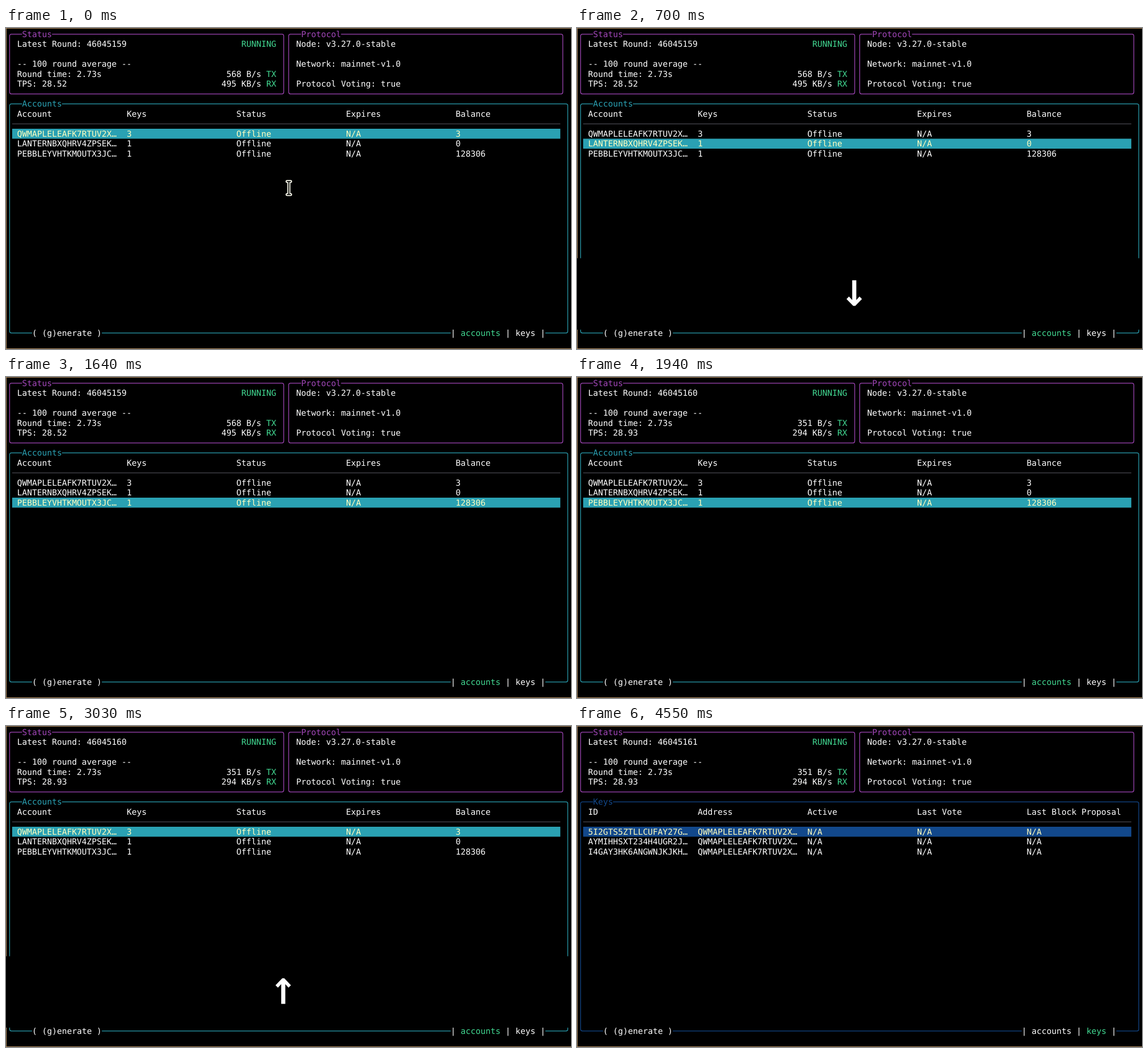
Write an HTML page that moves like this. It is 992 by 564 pixels and loops after 4610 ms.

```html
<!DOCTYPE html>
<html lang="en">
<head>
<meta charset="utf-8">
<title>Node terminal</title>
<style>
  html, body { margin: 0; width: 100%; height: 100%; overflow: hidden; background: #000; }
  svg { display: block; width: 992px; height: 564px; }
  text {
    font: 14.535px "DejaVu Sans Mono", monospace;
    fill: #fff;
    text-rendering: geometricPrecision;
    white-space: pre;
  }
</style>
</head>
<body>
<svg id="stage" viewBox="0 0 992 564" xmlns="http://www.w3.org/2000/svg"></svg>
<script>
const LOOP = 4610;
const CW = 8.75, CH = 17.5;            // terminal cell
const PURPLE = '#a347ba', CYAN = '#2aa1b3', BLUE = '#12488b';
const GREEN = '#42d992', PALE = '#ffffc0', EDGE = '#b58f62';
const COLS = [2, 24, 46, 68, 90];

// Key presses: time, key, and the row or view it leads to
const PRESSES = [
  { at: 540, key: 'down', row: 1 },
  { at: 1110, key: 'down', row: 2 },
  { at: 2160, key: 'up', row: 1 },
  { at: 2740, key: 'up', row: 0 },
  { at: 3790, key: 'enter', row: 0, keys: true }
];
const HOLD = 500, RECENT = 110;
const TRAFFIC_AT = 1800, ROUND_AT = 4450;

const ADDR = 'QWMAPLELEAFK7RTUV2X…';
const ACCOUNTS = {
  title: 'Accounts', color: CYAN,
  head: ['Account', 'Keys', 'Status', 'Expires', 'Balance'],
  rows: [
    [ADDR, '3', 'Offline', 'N/A', '3'],
    ['LANTERNBXQHRV4ZPSEK…', '1', 'Offline', 'N/A', '0'],
    ['PEBBLEYVHTKMOUTX3JC…', '1', 'Offline', 'N/A', '128306']
  ]
};
const KEYS = {
  title: 'Keys', color: BLUE,
  head: ['ID', 'Address', 'Active', 'Last Vote', 'Last Block Proposal'],
  rows: ['5I2GTS5ZTLLCUFAY27G…', 'AYMIHHSXT234H4UGR2J…', 'I4GAY3HK6ANGWNJKJKH…']
    .map(id => [id, ADDR, 'N/A', 'N/A', 'N/A'])
};

const left = c => 2 + c * CW;
const midX = c => left(c) + CW / 2;
const midY = r => 10.8 + r * CH;

const text = (c, r, s, fill = '#fff') =>
  `<text x="${left(c)}" y="${15.6 + r * CH}" fill="${fill}" style="fill:${fill}">${s}</text>`;
const rect = (x, y, w, h, fill) =>
  `<rect x="${x}" y="${y}" width="${w}" height="${h}" fill="${fill}"/>`;
const line = (d, color, width = 1.2) =>
  `<path d="${d}" fill="none" stroke="${color}" stroke-width="${width}"/>`;

// Rounded frame with a titled top edge; gaps are column pairs left open at the bottom
function panel(c0, r0, c1, r1, title, color, gaps = []) {
  const x0 = midX(c0), x1 = midX(c1), y0 = midY(r0), y1 = midY(r1), k = 3;
  const t0 = left(c0 + 3), t1 = t0 + title.length * CW;
  let d = `M${t0} ${y0}H${x0 + k}Q${x0} ${y0} ${x0} ${y0 + k}V${y1 - k}Q${x0} ${y1} ${x0 + k} ${y1}`;
  for (const [a, b] of gaps) d += `H${left(a)}M${left(b)} ${y1}`;
  d += `H${x1 - k}Q${x1} ${y1} ${x1} ${y1 - k}V${y0 + k}Q${x1} ${y0} ${x1 - k} ${y0}H${t1}`;
  return line(d, color) + text(c0 + 3, r0, title, color);
}

function status(round, busy) {
  const [tps, tx, rx] = busy ? ['28.93', '351', '294'] : ['28.52', '568', '495'];
  return panel(0, 0, 55, 6, 'Status', PURPLE) +
    text(2, 1, 'Latest Round: ' + round) + text(47, 1, 'RUNNING', GREEN) +
    text(2, 3, '-- 100 round average --') +
    text(2, 4, 'Round time: 2.73s') + text(44, 4, tx + ' B/s') + text(52, 4, 'TX', GREEN) +
    text(2, 5, 'TPS: ' + tps) + text(43, 5, rx + ' KB/s') + text(52, 5, 'RX', GREEN);
}

function protocol() {
  return panel(56, 0, 111, 6, 'Protocol', PURPLE) +
    text(58, 1, 'Node: v3.27.0-stable') +
    text(58, 3, 'Network: mainnet-v1.0') +
    text(58, 5, 'Protocol Voting: true');
}

function table(view, selected) {
  const cells = (list, r, fill) => list.map((s, i) => text(COLS[i], r, s, fill)).join('');
  const tab = v => v === view ? GREEN : '#fff';
  return panel(0, 7, 112, 30, view.title, view.color, [[5, 19], [89, 108]]) +
    cells(view.head, 8) +
    line(`M${left(1)} 168.5H${left(111)}`, '#565660', 1) +
    rect(left(1), 177, 110 * CW, 17.5, view.color)
      .replace('y="177"', `y="${177 + selected * CH}"`) +
    view.rows.map((row, i) => cells(row, 10 + i, i === selected ? PALE : '#fff')).join('') +
    text(5, 30, '( (g)enerate )') +
    text(89, 30, '|') + text(91, 30, 'accounts', tab(ACCOUNTS)) +
    text(100, 30, '|') + text(102, 30, 'keys', tab(KEYS)) + text(107, 30, '|');
}

const ARROW = '<path fill="#fff" d="M483.2 443.3H490.4V478L496 471.8L500.3 476.2' +
  'L488.6 488.3H485L473.2 476.2L477.5 471.8L483.2 478Z"/>';
const GLYPHS = {
  down: ARROW,
  up: `<g transform="matrix(1 0 0 -1 0 931.6)">${ARROW}</g>`,
  enter: line('M496.8 445H508.2V473.6H477.6V481.4L465 468.4L477.6 455.4V463.4H496.8Z', '#fff', 3.6)
};

function overlay(key, recent) {
  return rect(0, 404.5, 992, 125.5, '#000') + GLYPHS[key] +
    (recent ? rect(461, 489.2, 50.6, 2.8, '#fff') : '');
}

function pointer() {
  const d = 'M493.6 269.6H499.6M496.6 269.6V292.6M493.6 292.6H499.6';
  return `<g stroke-linecap="round">${line(d, '#fffff0', 5.4)}${line(d, '#000', 1.9)}</g>`;
}

const edges = rect(0, 0, 992, 1, EDGE) + rect(0, 0, 1, 564, EDGE) + rect(0, 563, 992, 1, EDGE);
const stage = document.getElementById('stage');
let shown = '';

function draw(t) {
  const press = PRESSES.filter(p => t >= p.at).pop();
  const age = press ? t - press.at : Infinity;
  const round = 46045159 + (t >= TRAFFIC_AT) + (t >= ROUND_AT);
  const view = press && press.keys ? KEYS : ACCOUNTS;
  const markup = rect(0, 0, 992, 564, '#000') + edges +
    status(round, t >= TRAFFIC_AT) + protocol() +
    table(view, press ? press.row : 0) +
    (press ? '' : pointer()) +
    (age < HOLD ? overlay(press.key, age < RECENT) : '');
  if (markup !== shown) stage.innerHTML = shown = markup;
}

function tick() {
  draw(performance.now() % LOOP);
  requestAnimationFrame(tick);
}
tick();
</script>
</body>
</html>
```
